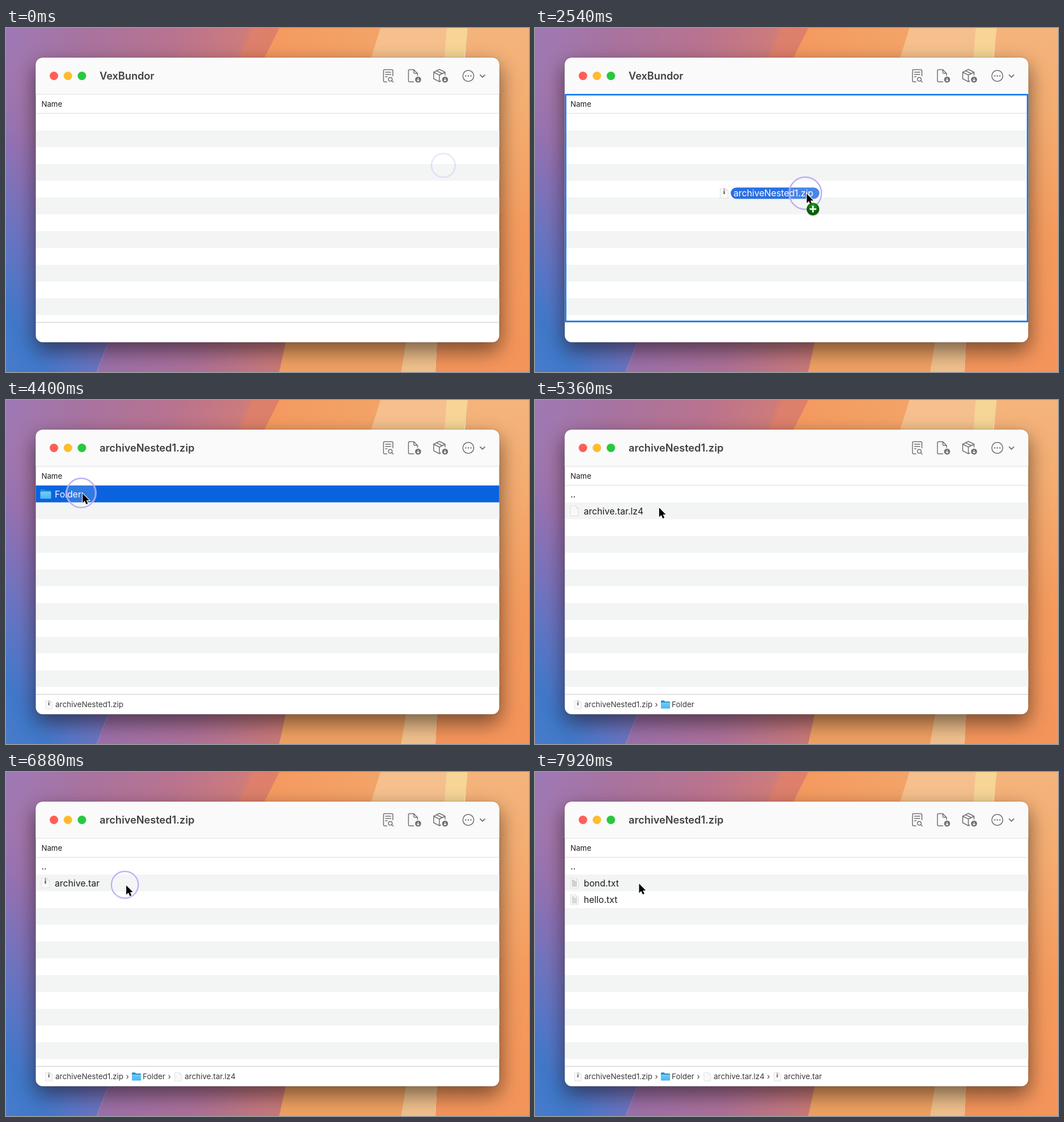
Recreate the animation shown at these times as an HTML page. Size 922 px wide and 607 px high, loop 8 s.

```html
<!DOCTYPE html>
<html lang="en">
<head>
<meta charset="utf-8">
<title>Archive browser</title>
<style>
html, body { margin: 0; width: 100%; height: 100%; overflow: hidden; }
svg { display: block; font-family: Inter, "Liberation Sans", sans-serif; }
.shadow { filter: drop-shadow(0 14px 18px rgba(0,0,0,.42)) drop-shadow(0 0 1px rgba(0,0,0,.35)); }
.tools { fill: none; stroke: #707070; stroke-width: 1.5; stroke-linejoin: round; stroke-linecap: round; }
</style>
</head>
<body>
<svg width="922" height="607" viewBox="0 0 922 607">
  <defs>
    <linearGradient id="top" gradientUnits="userSpaceOnUse" x2="427" y2="164"><stop stop-color="#9d79b6"/><stop offset=".3" stop-color="#a8739f"/><stop offset=".62" stop-color="#b9738f"/><stop offset=".87" stop-color="#cd7b7c"/><stop offset=".89" stop-color="#dc7f6c"/><stop offset="1" stop-color="#de8069"/></linearGradient>
    <linearGradient id="left" gradientUnits="userSpaceOnUse" x2="-273" y2="170"><stop offset=".1" stop-color="#9874b4" stop-opacity="0"/><stop offset=".32" stop-color="#9071b3"/><stop offset=".5" stop-color="#7473bd"/><stop offset=".68" stop-color="#5776c6"/><stop offset=".82" stop-color="#4078c9"/><stop offset="1" stop-color="#487bcb"/></linearGradient>
    <linearGradient id="low"><stop stop-color="#9a70ab"/><stop offset=".5" stop-color="#ac7098"/><stop offset="1" stop-color="#cc7a74"/></linearGradient>
    <linearGradient id="mid"><stop stop-color="#f5935b"/><stop offset="1" stop-color="#f3a468"/></linearGradient>
    <linearGradient id="right" x2="0" y2="1"><stop stop-color="#f4b47c"/><stop offset=".25" stop-color="#f4ac70"/><stop offset=".6" stop-color="#f49a5d"/><stop offset="1" stop-color="#f3945b"/></linearGradient>
    <linearGradient id="folder" x2="0" y2="1"><stop stop-color="#6fcdf8"/><stop offset="1" stop-color="#4fb5ee"/></linearGradient>
    <radialGradient id="green" cy=".3"><stop stop-color="#25a51f"/><stop offset="1" stop-color="#075c07"/></radialGradient>
  </defs>

  <path d="M0 0H490V300H0z" fill="url(#top)"/>
  <path d="M0 0H60V530H190L160 607H0z" fill="url(#left)"/>
  <path d="M190 530H500L482 607H160z" fill="url(#low)"/>
  <path d="M482 0H670L640 300H330z" fill="url(#mid)"/>
  <path d="M498 530H710L697 607H482z" fill="#efa062"/>
  <path d="M660 0H780L770 100H629z" fill="#f5c08d"/>
  <path d="M777 0H816L800 100H769z" fill="#f6d596"/>
  <path d="M814 0H922V607H757L761 530H840V100H804z" fill="url(#right)"/>
  <path d="M709 530H761L757 607H697z" fill="#efc08c"/>

  <rect class="shadow" x="52.5" y="52.5" width="817" height="502" rx="12" fill="#fff"/>
  <path d="M52.5 117V64.5a12 12 0 0 1 12-12H857.5a12 12 0 0 1 12 12V117z" fill="#fafafa"/>
  <g id="lights"></g>
  <g class="tools">
    <path d="M671.5 95h-4a2 2 0 0 1-2-2v-17.500a2 2 0 0 1 2-2h12.500a2 2 0 0 1 2 2v9M669 78h9.500M669 82h9.500M669 86h3M680 93l2.700 2.500"/>
    <circle cx="677.5" cy="90.500" r="3.300"/>
    <path d="M719 95h-7.500a2 2 0 0 1-2-2v-17.500a2 2 0 0 1 2-2h7.500l6.500 7v3.500M719 73.500v5a1.500 1.500 0 0 0 1.500 1.500h5"/>
    <path d="M764 73l10 5v5M764 73l-10 5v11.500l10 5.300 2.500-1.300M754 78l10 5 10-5M764 83v11.800M759 75.500l10 5"/>
    <circle cx="815" cy="84.500" r="9.700"/>
    <path d="M810.500 84.500h.01M815 84.500h.01M819.500 84.500h.01" stroke-width="2.400"/>
    <path d="M836 82.800l4 4 4-4" stroke-width="1.800"/>
  </g>
  <g id="badges"></g>
  <g id="stripes" fill="#f3f5f5"></g>
  <path d="M53 117H869.5M53 150.500H869.5" stroke="#ddd"/>
  <path d="M53 519.3H869.5" stroke="#c6c6c6"/>
  <text x="62.5" y="138.800" font-size="13.200" fill="#1c1c1c">Name</text>
  <g id="content"></g>
  <rect id="border" x="54" y="117.7" width="814.3" height="400" fill="none" stroke="#0a7af5" stroke-width="2.600"/>
  <g id="pill"></g>
  <g id="ring">
    <circle r="1" fill="#fff" fill-opacity=".15" stroke="#d6ccff" stroke-opacity=".5" stroke-width="3.500"/>
    <circle r="1" fill="none" stroke="#b3a5f1" stroke-width="1.700"/>
  </g>
  <g id="cursor">
    <path d="M.5 1V17.500L4.500 14 7 20 10 18.700 7.500 13H12.500z" fill="#000" fill-opacity=".2"/>
    <path d="M0 0V16.500L3.800 13 6.400 19 9.200 17.800 6.700 12H11.700z" stroke="#fff" stroke-width="2" paint-order="stroke"/>
    <g id="plus">
      <circle cx="11" cy="28" r="11.500" fill-opacity=".15"/>
      <circle cx="11" cy="27" r="11" fill="url(#green)"/>
      <path d="M5 27h12M11 21v12" stroke="#fff" stroke-width="2.600"/>
    </g>
  </g>
</svg>
<script>
const LOOP = 8000, ROW = 29.6, ARCHIVE = 'archiveNested1.zip';
const $ = id => document.getElementById(id);
const text = (x, y, s, size, fill = '#1c1c1c', weight = 400) =>
  `<text x="${x}" y="${y}" font-size="${size}" fill="${fill}" font-weight="${weight}">${s}</text>`;
const ramp = (t, from, to) => Math.min(1, Math.max(0, (t - from) / (to - from)));

// Icons live in a 20 x 20 box
const page = '<path d="M2.5 1.5h9.5l4.5 4.5v13h-14z" fill="#f9f9f9" stroke="#d8d8d8" stroke-width=".8"/>' +
  '<path d="M12 1.5v4.5h4.5z" fill="#e4e4e4"/>';
const icons = {
  page,
  zip: page + '<path d="M9.5 2v9" stroke="#888" stroke-width="2.4" stroke-dasharray="1.3 .7"/>' +
    '<path d="M9.5 6.5v5" stroke="#666" stroke-width="2.2"/>',
  txt: page + '<path d="M5 5.5h5M5 8h9M5 10.5h9M5 13h9M5 15.5h9" stroke="#aaa" stroke-width="1.1"/>',
  folder: '<path d="M.5 3a1.5 1.5 0 0 1 1.5-1.5h5l2 2h9a1.5 1.5 0 0 1 1.5 1.5v4H.5z" fill="#1f8dcc"/>' +
    '<rect x=".5" y="5.5" width="19" height="12.7" rx="1.5" fill="url(#folder)"/>'
};
const icon = (kind, x, y, scale = 1) =>
  `<g transform="translate(${x} ${y}) scale(${scale})">${icons[kind]}</g>`;

// The items opened one after another: icon, name, place in the path bar
const opened = [
  ['zip', ARCHIVE, 87], ['folder', 'Folder', 241],
  ['page', 'archive.tar.lz4', 315], ['zip', 'archive.tar', 438.5]
];
const up = ['', '..'];
const lists = [
  [], [opened[1]], [up, opened[2]], [up, opened[3]], [up, ['txt', 'bond.txt'], ['txt', 'hello.txt']]
];

const DRAG = 1480, DROP = 2540, SELECT = 80, OPEN = 400;
const clicks = [4240, 5680, 6880];
const switches = [DROP + 80, ...clicks.map(c => c + OPEN)];

// Pointer moves: start, end, target x and y, strength of the slowdown
const moves = [
  [DRAG, DRAG + 1, 925, 425, 1], [DRAG, 2040, 479, 292.5, 1.4], [3290, 3990, 135, 165, 3.6],
  [5220, 5360, 219, 190, 2], [5360, 5600, 200, 196, 2], [6560, 6640, 212, 200, 2], [7700, 7920, 183.5, 197, 2]
];
function pointer(t) {
  let x = 773.5, y = 243.5;
  for (const [from, to, tx, ty, power] of moves) {
    const u = 1 - (1 - ramp(t, from, to)) ** power;
    x += (tx - x) * u;
    y += (ty - y) * u;
  }
  return [x, y];
}

// Button presses: a ring grows on each press and shrinks away on release
const presses = [[-900, -200], [1590, DROP], ...clicks.flatMap(c => [[c - 50, c + 90], [c + 190, c + OPEN]])];
const pressure = t => Math.max(...presses.map(([down, up]) =>
  ramp(t, down, down + 110) * (1 - ramp(t, up, up + 240))));

function drawList(n, selected) {
  let out = text(165, 90.8, n ? ARCHIVE : 'VexBundor', 18.15, '#404040', 600);
  lists[n].forEach(([kind, name], i) => {
    const y = 151 + i * ROW, on = i === selected;
    if (on) out += `<rect x="52.5" y="${y}" width="817" height="${ROW}" fill="#0a63de"/>`;
    if (kind) out += icon(kind, 60, y + 5);
    out += text(kind ? 86 : 62.5, y + 21, name, 15.75, on ? '#fff' : '#1c1c1c');
  });
  opened.slice(0, n).forEach(([kind, name, x], i) => {
    out += icon(kind, x - 19.5, 529, .85) + text(x, 542.3, name, 13.45, '#3a3a3a');
    if (i) out += text(x - 29.5, 541.8, '›', 13.45, '#3a3a3a');
  });
  $('content').innerHTML = out;
}

$('lights').innerHTML = ['#ff5f57', '#febc2e', '#28c840'].map((fill, i) =>
  `<circle cx="${84.5 + i * 24.65}" cy="84.5" r="7.5" fill="${fill}"/>`).join('');
$('badges').innerHTML = [726.5, 774].map(x =>
  `<circle cx="${x}" cy="91" r="6.8" fill="#fafafa"/><circle cx="${x}" cy="91" r="5.3" fill="#707070"/>
   <path d="M${x} 88v5.5m-2.3-2.2l2.3 2.3 2.3-2.3" fill="none" stroke="#fff" stroke-width="1.2"/>`).join('');
$('stripes').innerHTML = [0, 1, 2, 3, 4, 5].map(i =>
  `<rect x="53" y="${180.8 + i * 2 * ROW}" width="816.5" height="${ROW}"/>`).join('');
$('pill').innerHTML = icon('zip', -21, -10) +
  '<rect y="-10" width="156.5" height="20" rx="10" fill="#2a6fe4"/>' + text(5, 5.7, ARCHIVE, 15.75, '#fff');

const place = (id, x, y, opacity) => {
  $(id).setAttribute('transform', `translate(${x} ${y})`);
  $(id).setAttribute('opacity', opacity);
};

let shown = '';
function render(t) {
  const n = switches.filter(s => t >= s).length;
  const picked = clicks.some(c => t >= c + SELECT && t < c + OPEN) ? lists[n].length - 1 : -1;
  if (shown !== n + ':' + picked) {
    shown = n + ':' + picked;
    drawList(n, picked);
  }

  const [x, y] = pointer(t);
  place('cursor', x, y, +(t >= DRAG));
  $('plus').setAttribute('opacity', +(n === 0));
  $('border').setAttribute('opacity', +(t >= DRAG + 80 && n === 0));

  // The dragged label settles a little behind the pointer, then fades after the drop
  const settle = ramp(t, DRAG, DRAG + 400);
  const fade = t < DRAG ? 0 : 1 - ramp(t, 2860, 3100);
  place('pill', x - 115 - 19 * settle, y - 1, (.75 + .25 * settle) * fade);

  const level = pressure(t);
  place('ring', x - 2.5, y - 1, Math.min(1, level * 2));
  for (const c of $('ring').children) c.setAttribute('r', 19.5 + 9 * level);
}

function tick() {
  render(performance.now() % LOOP);
  requestAnimationFrame(tick);
}
tick();
</script>
</body>
</html>
```
